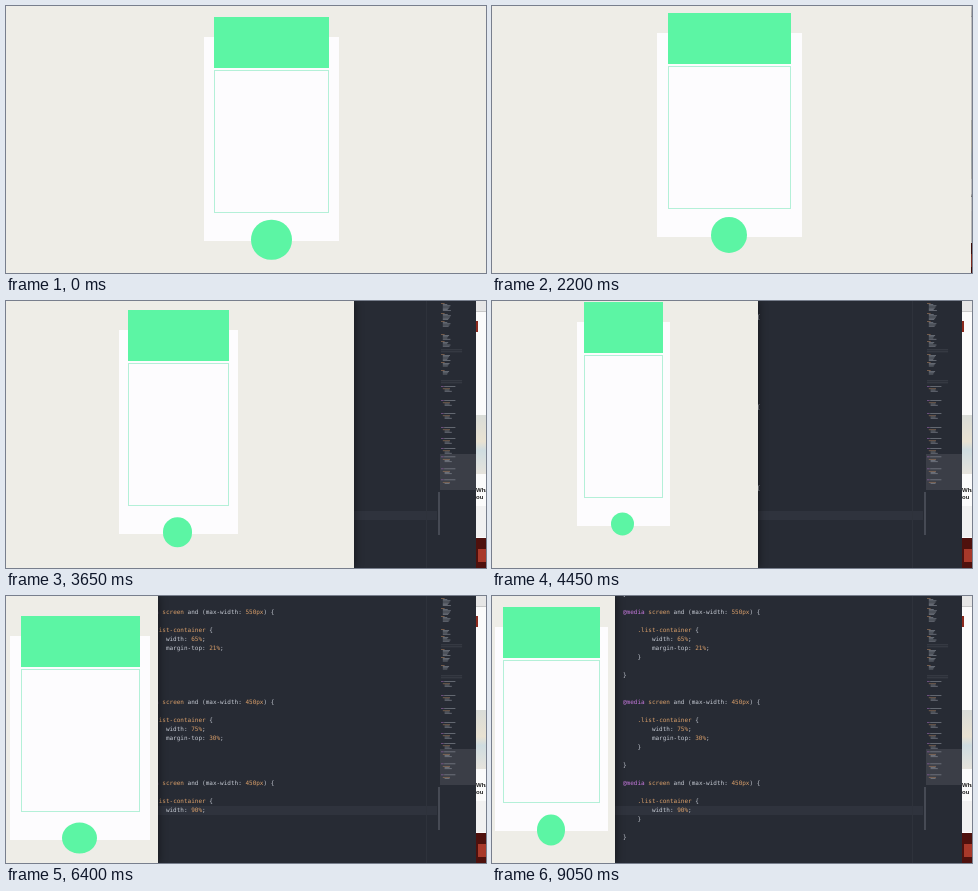
Recreate the animation shown at these times as an HTML page. Size 480 by 267 pixels, loop 9100 ms.

```html
<!DOCTYPE html>
<html lang="en">
<head>
<meta charset="utf-8">
<title>Responsive list</title>
<style>
  html, body { margin: 0; width: 100%; height: 100%; overflow: hidden; }
  .stage { position: relative; width: 480px; height: 267px; overflow: hidden; background: #272b34; }
  .stage div, .stage svg, pre { position: absolute; box-sizing: border-box; }

  /* Editor */
  .line { left: 0; top: 210px; width: 431px; height: 9px; background: #2f333d; }
  .ruler { left: 420px; top: 0; width: 1px; height: 267px; background: #2e323b; }
  .thumb { left: 432px; top: 191px; width: 2px; height: 43px; background: #464a54; }
  .view { left: 434px; top: 153px; width: 36px; height: 36px; background: #3b3e47; }
  .map { left: 434px; top: 0; opacity: .85; }
  pre {
    left: 131px; top: -7px; margin: 0; color: #c5cad3;
    font: 6.01px/9px "DejaVu Sans Mono", monospace;
  }
  pre b { font-weight: normal; color: #c678dd; }
  pre i { font-style: normal; color: #dba06a; }

  /* Window at the far right */
  .side { left: 470px; top: 0; width: 10px; height: 267px; background: #fbfbfb; overflow: hidden; }
  .side div { left: 0; width: 10px; }
  .bar { top: 0; height: 11px; background: #e6e6e6; border-bottom: 1px solid #c8c8c8; }
  .side .badge { top: 20px; width: 2px; height: 11px; background: #8c2a1e; }
  .photo { top: 114px; height: 59px; background: linear-gradient(#d9dcd8, #e9e2d2 45%, #cfdce0 60%, #e6e3dc); }
  .rest { top: 205px; height: 31px; background: #f1f1f1; }
  .poster { top: 237px; height: 30px; background: #4f110d; }
  .side .blob { left: 2px; top: 248px; width: 8px; height: 13px; background: #a8392a; }
  .side p { position: absolute; left: 0; top: 186px; margin: 0; color: #222;
    font: bold 6px/7px "Liberation Sans", sans-serif; }

  /* Browser window, narrowed from the right */
  .page {
    container-type: inline-size;
    left: 0; top: 0; width: 535px; height: 267px; padding-right: 3.6px;
    background: #eeede7; box-shadow: 1px 0 8px rgba(0, 0, 0, .45);
    animation: narrow 9100ms linear infinite;
  }
  @keyframes narrow {
    0%, 18.4% { width: 535px; }
    24.2% { width: 479px; }
    28.6% { width: 445px; }
    34.1% { width: 409px; }
    40.1% { width: 348px; }
    49.5% { width: 261px; }
    61% { width: 194px; }
    70.3% { width: 152.4px; animation-timing-function: ease-out; }
    80.8%, 100% { width: 123px; }
  }
  .card {
    --w: calc(24.3cqw + 6px);
    --gap: 6.7cqw;
    left: calc(50cqw - var(--w) / 2); top: calc(var(--gap) - 4.8px);
    width: var(--w); height: 204px; background: #fdfcfe;
  }
  .head { left: 7.5%; top: -20px; width: 85%; height: 51px; background: #5cf5a4; }
  .list { left: 7.5%; top: 33px; width: 85%; height: 143px; border: 1px solid #b4f0d8; }
  .dot {
    left: 35%; top: 203px; width: 30%; height: calc(var(--w) * .3);
    transform: translateY(-50%); border-radius: 50%; background: #5cf5a4;
  }
  @container (max-width: 494px) {
    .card { --w: calc(29.2cqw + 6px); }
    .dot { left: 37%; top: 202px; width: 25%; height: calc(var(--w) * .25); }
  }
  @container (max-width: 424px) {
    .card { --w: calc(32.2cqw + 6px); --gap: 9.8cqw; }
  }
  @container (max-width: 375px) {
    .card { --w: calc(32.8cqw + 6px); }
  }
  @container (max-width: 194px) {
    .card { --w: calc(65cqw + 6px); --gap: 21cqw; }
    .dot { top: 202.5px; height: 31px; }
  }
  @container (max-width: 159px) {
    .card { --w: calc(90cqw + 6px); --gap: 30cqw; }
  }
</style>
</head>
<body>
<div class="stage">
  <div class="line"></div>
  <div class="ruler"></div>
<pre>}

<b>@media</b> <i>screen</i> and (max-width: <i>550px</i>) {

    <i>.list-container</i> {
        width: <i>65%</i>;
        margin-top: <i>21%</i>;
    }

}


<b>@media</b> <i>screen</i> and (max-width: <i>450px</i>) {

    <i>.list-container</i> {
        width: <i>75%</i>;
        margin-top: <i>30%</i>;
    }

}

<b>@media</b> <i>screen</i> and (max-width: <i>450px</i>) {

    <i>.list-container</i> {
        width: <i>90%</i>;
    }

}</pre>
  <div class="thumb"></div>
  <div class="view"></div>
  <svg class="map" width="36" height="267"></svg>

  <div class="side">
    <div class="bar"></div>
    <div class="badge"></div>
    <div class="photo"></div>
    <p>What<br>ou</p>
    <div class="rest"></div>
    <div class="poster"></div>
    <div class="blob"></div>
  </div>

  <div class="page">
    <div class="card">
      <div class="head"></div>
      <div class="list"></div>
      <div class="dot"></div>
    </div>
  </div>
</div>
<script>
  const map = document.querySelector('.map');
  const pitch = 1.22, charWidth = 0.45;
  const grey = '#8d929c', orange = '#a67d5e', purple = '#9a68ab';

  function bar(y, indent, chars, color) {
    const rect = document.createElementNS('http://www.w3.org/2000/svg', 'rect');
    const box = { x: 1 + indent * charWidth, y, width: chars * charWidth, height: 0.7, fill: color };
    for (const key in box) rect.setAttribute(key, box[key]);
    map.append(rect);
  }

  // Plain rules: start and number of properties
  const rules = [[2, 6], [12, 5], [20, 4], [33, 4], [40, 4], [53, 5], [61, 3], [69, 3]];
  for (const [y, count] of rules) {
    bar(y, 0, 8, orange);
    for (let i = 1; i <= count; i++) bar(y + i * pitch, 4, 10 + (i * 7 + y) % 9, grey);
  }

  for (const y of [48.5, 50.5, 79.5, 81.5]) bar(y, 0, 47, '#484c56');

  // Media queries
  for (const y of [85, 99, 112, 126, 137, 147, 155.5, 167.5, 178.5]) {
    bar(y, 0, 6, purple);
    bar(y, 7, 25, grey);
    bar(y + 2 * pitch, 4, 16, orange);
    bar(y + 3 * pitch, 8, 11, grey);
    if (y < 178) bar(y + 4 * pitch, 8, 16, grey);
  }
</script>
</body>
</html>
```
